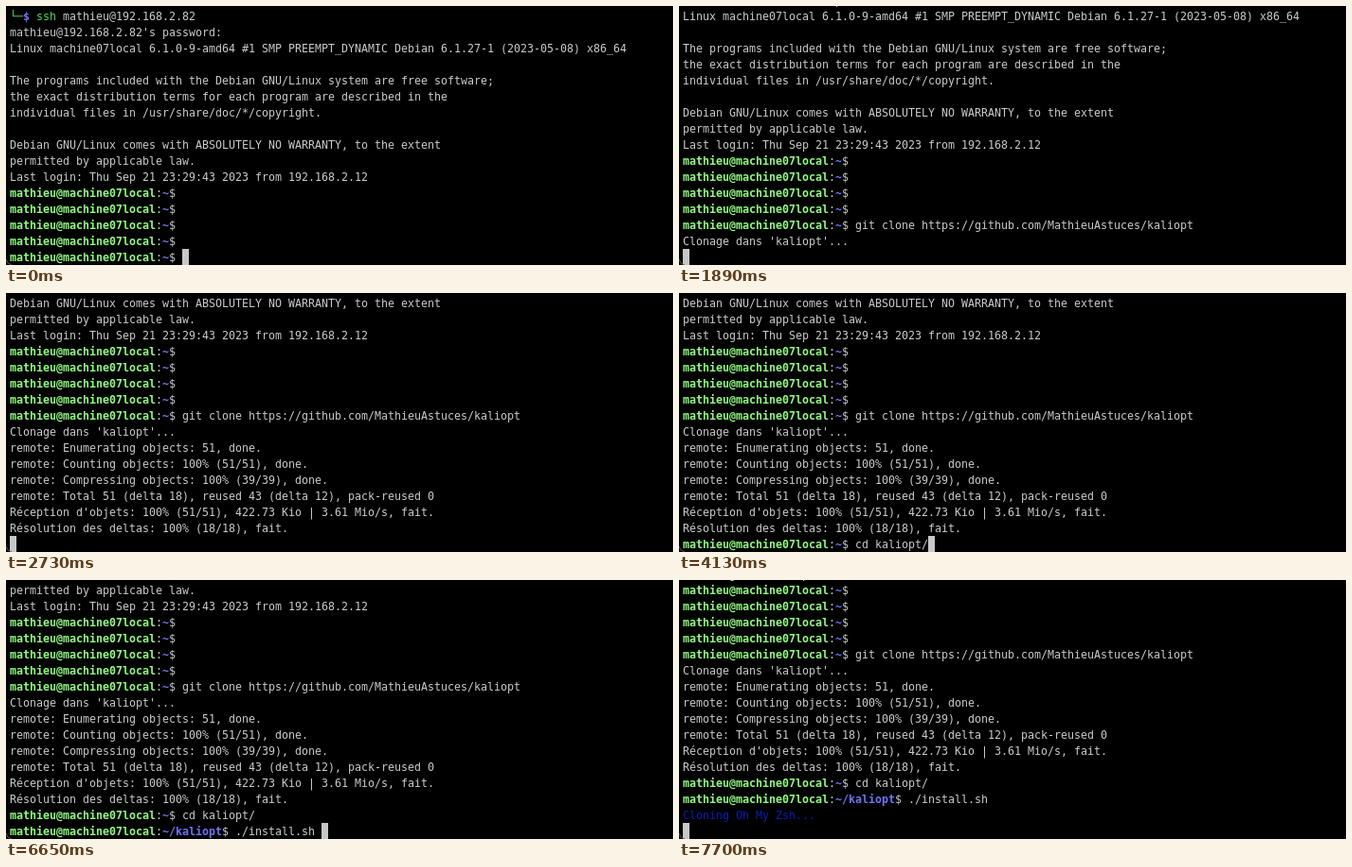
An HTML page that plays this animation: 704 px wide and 274 px high, repeating every 8000 ms.

```html
<!DOCTYPE html>
<html lang="fr">
<head>
<meta charset="utf-8">
<title>Terminal</title>
<style>
html, body { margin: 0; width: 100%; height: 100%; overflow: hidden; background: #000; }
#stage { position: relative; width: 704px; height: 274px; overflow: hidden; background: #000; }
#term {
  position: absolute; left: 4px; bottom: 0; margin: 0; color: #cbcbcb;
  font: 11.63px/17px "DejaVu Sans Mono", "Liberation Mono", monospace;
}
#out { position: relative; top: 1px; }
b { color: #92fb82; }
b.path { color: #6f74f2; }
.green { color: #4fd84f; }
.blue { color: #0c1cb8; }
#cursor { display: inline-block; width: 7px; height: 17px; vertical-align: top; background: #c7c7c7; }
svg { position: absolute; left: 0; bottom: 0; }
</style>
</head>
<body>
<div id="stage">
  <pre id="term"><span id="out"></span><span id="cursor"></span></pre>
  <svg width="8" height="8"><path d="M0 2Q1 7 6 8" fill="none" stroke="#555"/></svg>
</div>
<script>
const LOOP = 8000;
const user = 'mathieu';
const host = 'machine07local';
const prompt = (dir = '~') => `<b>${user}@${host}</b>:<b class="path">${dir}</b>$ `;

const login = `<span class="green">└─</span><b class="path">$</b> <span class="green">ssh</span> ${user}@192.168.2.82
${user}@192.168.2.82's password:
Linux ${host} 6.1.0-9-amd64 #1 SMP PREEMPT_DYNAMIC Debian 6.1.27-1 (2023-05-08) x86_64

The programs included with the Debian GNU/Linux system are free software;
the exact distribution terms for each program are described in the
individual files in /usr/share/doc/*/copyright.

Debian GNU/Linux comes with ABSOLUTELY NO WARRANTY, to the extent
permitted by applicable law.
Last login: Thu Sep 21 23:29:43 2023 from 192.168.2.12
`;

const remote = `remote: Enumerating objects: 51, done.
remote: Counting objects: 100% (51/51), done.
remote: Compressing objects: 100% (39/39), done.
remote: Total 51 (delta 18), reused 43 (delta 12), pack-reused 0
`;

const received = `Réception d'objets: 100% (51/51), 422.73 Kio | 3.61 Mio/s, fait.
Résolution des deltas: 100% (18/18), fait.
`;

// Each entry appends its text to the terminal at the given time (ms).
const events = [
  [0, login + Array(5).fill(prompt()).join('\n')],
  [910, 'git clone https://github.com/MathieuAstuces/kaliopt'],
  [1890, "\nClonage dans 'kaliopt'...\n"],
  [2660, remote],
  [2730, received],
  [2800, prompt()],
  [3570, 'c'],
  [3640, 'd'],
  [3710, ' '],
  [3990, 'k'],
  [4130, 'aliopt/'],
  [4970, '\n' + prompt('~/kaliopt')],
  [5880, '.'],
  [6090, '/'],
  [6440, 'i'],
  [6510, 'n'],
  [6650, 'stall.sh '],
  [7560, '\n'],
  [7630, '<span class="blue">Cloning Oh My Zsh...</span>\n']
];

const out = document.getElementById('out');
let shown = 0;

function draw() {
  const t = performance.now() % LOOP;
  const due = events.filter(([at]) => at <= t);
  if (due.length !== shown) {
    shown = due.length;
    out.innerHTML = due.map(([, text]) => text).join('');
  }
  requestAnimationFrame(draw);
}
draw();
</script>
</body>
</html>
```
